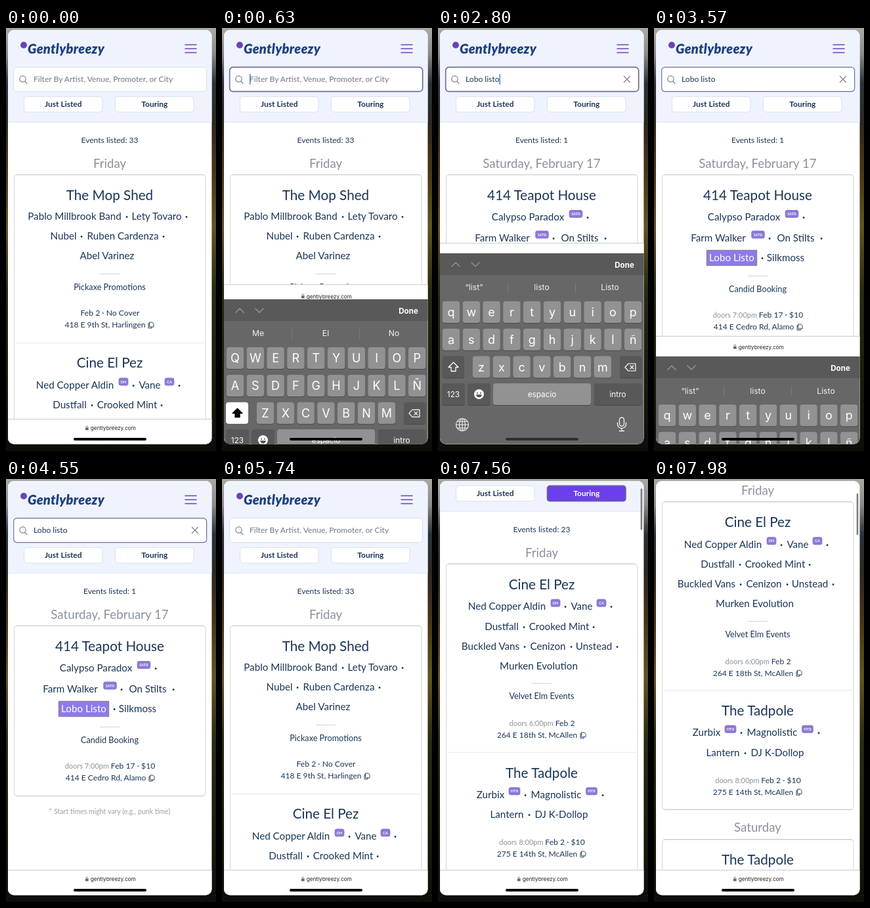
Animation, 320 px wide and 644 px high, one loop 8000 ms. Source, as an HTML page:

```html
<!DOCTYPE html>
<html lang="en">
<head>
<meta charset="utf-8">
<title>Event search</title>
<style>
html, body { margin: 0; height: 100%; overflow: hidden; background: #11150c; }
svg { display: block; width: 100vw; height: 100vh; font-family: Lato, sans-serif; }
.ui { font-family: Inter, Roboto, sans-serif; }
</style>
</head>
<body>
<svg id="stage" viewBox="0 0 320 644">
  <defs>
    <linearGradient id="photo" x2="0" y2="1">
      <stop offset="0" stop-color="#a9a9a4"/><stop offset=".06" stop-color="#8c8b86"/>
      <stop offset=".13" stop-color="#2b323b"/><stop offset=".22" stop-color="#2c2720"/>
      <stop offset=".34" stop-color="#493616"/><stop offset=".47" stop-color="#5f5420"/>
      <stop offset=".62" stop-color="#2a2a12"/><stop offset="1" stop-color="#0d0e09"/>
    </linearGradient>
    <clipPath id="phone"><rect x="3" y="3" width="310.500" height="630.500" rx="9"/></clipPath>
  </defs>
  <rect width="320" height="644" fill="url(#photo)"/>
  <g id="screen" clip-path="url(#phone)"></g>
</svg>
<script>
const NS = 'http://www.w3.org/2000/svg';
const INK = '#1a3555', GREY = '#8b929c', RULE = '#d4d4d6';
const screen = document.getElementById('screen');

function el(parent, tag, attrs = {}) {
  const node = document.createElementNS(NS, tag);
  set(node, attrs);
  return parent.appendChild(node);
}
function set(node, attrs) {
  for (const k in attrs) node.setAttribute(k, attrs[k]);
}
const group = (parent, attrs) => el(parent, 'g', attrs);
const rect = (g, x, y, width, height, fill, more) =>
  el(g, 'rect', { x, y, width, height, fill, ...more });
const path = (g, d, stroke, width = 1, more) =>
  el(g, 'path', { d, stroke, 'stroke-width': width, fill: 'none',
    'stroke-linecap': 'round', 'stroke-linejoin': 'round', ...more });
// y is the middle of the capitals
function text(g, x, y, str, size, fill = INK, more) {
  const node = el(g, 'text', { x, y: y + size * .36, 'font-size': size, fill, 'text-anchor': 'middle', ...more });
  node.textContent = str;
  return node;
}
const show = (node, on) => set(node, { visibility: on ? 'inherit' : 'hidden' });
const clamp = v => Math.max(0, Math.min(1, v));
const easeOut = p => 1 - (1 - clamp(p)) ** 3;
const mix = (a, b, p) => a + (b - a) * p;

// ---- page header ----
rect(screen, 0, 0, 320, 644, '#fff');
const page = group(screen);
rect(page, 0, -40, 320, 183, '#eef3fd');
rect(page, 0, 143, 320, 1, '#dfe7f4');
el(page, 'circle', { cx: 27, cy: 26, r: 5, fill: '#6a45b8' });
text(page, 33, 32, 'Gentlybreezy', 20, '#1d3f80',
  { 'text-anchor': 'start', 'font-weight': 900, 'font-style': 'italic', 'letter-spacing': .3 });
path(page, 'M273 25.500h17M273 31.500h17M273 37.500h17', '#6d3fb4', 1.5);

const box = rect(page, 11.7, 59.700, 294, 37, '#fff', { rx: 5 });
path(page, 'M29 81.500l3 3M30.200 77.500a4.700 4.700 0 1 1-9.400 0a4.700 4.700 0 1 1 9.400 0', '#7c8490', 1.2);
const left = { 'text-anchor': 'start' };
const hint = text(page, 42, 78, 'Filter By Artist, Venue, Promoter, or City', 12.1, '#6f7884', left);
const query = text(page, 42, 78, '', 12.1, INK, left);
const caret = rect(page, 42, 70, 1.5, 16, '#3f86d6');
const clear = path(page, 'M283.500 73.500l9 9M292.500 73.500l-9 9', '#747b88', 1.2);

function button(x, label) {
  return {
    back: rect(page, x, 104.500, 119.500, 23.500, '#fff', { rx: 4, stroke: '#dbe1ec' }),
    label: text(page, x + 59.8, 116, label, 12, INK, { 'font-weight': 700 })
  };
}
button(27.500, 'Just Listed');
const touring = button(166.500, 'Touring');
const count = text(page, 158, 171, '', 12.1);

// ---- event lists ----
const title = (g, y, str) => text(g, 158, y, str, 20.7);
const day = (g, y, str) => text(g, 158, y, str, 18.7, GREY);
const rule = (g, y) => rect(g, 143, y, 30, 1, '#cfd1d4');
const split = (g, y) => rect(g, 15, y, 287, 1, '#e6e7e9');
const promoter = (g, y, str) => text(g, 158, y, str, 12.7);

function card(g, top, bottom) {
  rect(g, 12.5, top + .5, 291.500, bottom - top, 'none', { rx: 4, stroke: RULE });
  rect(g, 16, top, 285, 1, '#c4c5c8');
  rect(g, 16, bottom, 285, 1.3, '#cbccd0');
}
// cells: centre x, text; "#" marks a state badge
function row(g, y, ...cells) {
  for (let i = 0; i < cells.length; i += 2) {
    const x = cells[i], s = cells[i + 1];
    if (s[0] === '#') {
      const w = 9 + 2.9 * (s.length - 1);
      rect(g, x - w / 2, y - 11, w, 12, '#8d78d6', { rx: 3.5 });
      text(g, x, y - 5, s.slice(1), 5.6, '#fff', { 'font-weight': 700 });
    } else {
      text(g, x, y, s, 15.2, INK, s === '·' ? { 'font-weight': 700 } : {});
    }
  }
}
function details(g, y, doors, date, address, iconX) {
  const line = text(g, 158.500, y, '', 12.2);
  if (doors) {
    const t = el(line, 'tspan', { 'font-size': 11, fill: GREY });
    t.textContent = 'doors ' + doors + ' ';
  }
  line.append(date);
  text(g, iconX - 70, y + 18, address, 12.1);
  path(g, `M${iconX - 2} ${y + 14}h4l2 2v5h-6zM${iconX - 2} ${y + 16}h-2v7h5v-2`, INK, .9);
}
function cine(g) {
  title(g, 254.500, 'Cine El Pez');
  row(g, 288, 105, 'Ned Copper Aldin', 179, '#OH', 194, '·', 219, 'Vane', 249, '#CA', 264, '·');
  row(g, 318.500, 97, 'Dustfall', 131, '·', 184.500, 'Crooked Mint', 237, '·');
  row(g, 348.500, 80, 'Buckled Vans', 132, '·', 167.500, 'Cenizon', 203, '·', 237.500, 'Unstead', 273, '·');
  row(g, 378.500, 153.500, 'Murken Evolution');
  rule(g, 405);
  promoter(g, 425, 'Velvet Elm Events');
  details(g, 466, '6:00pm', 'Feb 2', '264 E 18th St, McAllen', 221);
}

const all = group(page);
day(all, 206, 'Friday');
card(all, 223, 900);
title(all, 254.500, 'The Mop Shed');
row(all, 287, 104.500, 'Pablo Millbrook Band', 184, '·', 229.500, 'Lety Tovaro', 275, '·');
row(all, 317, 87.500, 'Nubel', 115, '·', 178, 'Ruben Cardenza', 240, '·');
row(all, 347, 154, 'Abel Varinez');
rule(all, 374);
promoter(all, 394, 'Pickaxe Promotions');
details(all, 434, '', 'Feb 2 · No Cover', '418 E 9th St, Harlingen', 221);
split(all, 479);
cine(group(all, { transform: 'translate(0 255.500)' }));

const found = group(page);
day(found, 206, 'Saturday, February 17');
card(found, 223, 482);
title(found, 254.500, '414 Teapot House');
row(found, 288, 137, 'Calypso Paradox', 210, '#SATX', 228, '·');
row(found, 319.500, 98, 'Farm Walker', 158.500, '#SATX', 176, '·', 216, 'On Stilts', 255, '·');
rect(found, 80.500, 338.500, 76, 23, '#9079ea', { stroke: '#8a80a0', 'stroke-width': 1.4 });
text(found, 118.500, 350, 'Lobo Listo', 15.2, '#fff');
row(found, 350, 165, '·', 200.500, 'Silkmoss');
rule(found, 377);
promoter(found, 397, 'Candid Booking');
details(found, 437, '7:00pm', 'Feb 17 · $10', '414 E Cedro Rd, Alamo', 222);
text(found, 158, 506, '* Start times might vary (e.g., punk time)', 10.6, '#9a9fa7');

const tours = group(page);
day(tours, 206, 'Friday');
card(tours, 223, 691.500);
cine(tours);
split(tours, 510);
title(tours, 541.500, 'The Tadpole');
row(tours, 574.500, 80, 'Zurbix', 116.500, '#HTX', 133, '·', 180, 'Magnolistic', 234, '#HTX', 251, '·');
row(tours, 605, 105, 'Lantern', 139, '·', 188, 'DJ K-Dollop');
details(tours, 647, '8:00pm', 'Feb 2 · $10', '275 E 14th St, McAllen', 221);
day(tours, 719, 'Saturday');
card(tours, 737, 1000);
title(tours, 768, 'The Tadpole');

const thumb = rect(screen, 308.700, 7, 2.600, 63, '#7d7d80', { rx: 1.300 });

// ---- browser bar ----
const bar = group(screen);
rect(bar, 0, 0, 320, 400, '#fff');
rect(bar, 0, 0, 320, 1, '#c9cacc');
const address = group(bar, { class: 'ui' });
text(address, 163.300, 14.500, 'gentlybreezy.com', 8.2, '#222');
rect(address, 121, 13.500, 4.600, 3.800, '#666', { rx: .8 });
path(address, 'M122 13.500v-1.300a1.300 1.300 0 0 1 2.600 0v1.300', '#666', .8);

// ---- keyboard ----
const board = group(screen, { class: 'ui' });
rect(board, 0, 343, 320, 400, '#676767');
rect(board, 0, 343, 320, 33, '#595959');
path(board, 'M21 363l6-6l6 6M51 357l6 6l6-6', '#8e8e8e', 1.5);
text(board, 284, 360.500, 'Done', 11.6, '#fff', { 'font-weight': 700 });
const picked = rect(board, 106, 380, 104, 30, '#717171', { rx: 4 });
const seams = path(board, 'M106.500 388v15M209.500 388v15', '#7b7b7b', 1);
const words = [55, 158, 262].map(x => text(board, x, 395, '', 12.2, '#f2f2f2'));

function key(x, y, w, fill) {
  rect(board, x, y + 1, w, 33, '#4a4a4a', { rx: 4 });
  return rect(board, x, y, w, 33, fill, { rx: 4 });
}
const letters = [];
[['qwertyuiop', 20], ['asdfghjklñ', 20], ['zxcvbnm', 66]].forEach(([chars, x0], r) => {
  [...chars].forEach((c, i) => {
    const x = x0 + i * 30.800, y = 416 + r * 41.800;
    key(x - 13.200, y, 26.400, '#929292');
    letters.push([c, text(board, x, y + 16.500, c, 18, '#fff')]);
  });
});
const DARK = '#585858';
const shiftKey = key(6, 499.600, 34, DARK);
const shift = path(board, 'M23.500 509l-7.500 7.500h4v6h7v-6h4z', '#fff', 1.3);
key(277, 499.600, 33.500, DARK);
path(board, 'M285 516.500l5-5.500h11v11h-11zM293 514l5 5M298 514l-5 5', '#fff', 1.2);
key(6, 541, 35, DARK);
text(board, 23.500, 557.500, '123', 11.8, '#fff');
key(45.500, 541, 34.500, DARK);
el(board, 'circle', { cx: 62.500, cy: 557.500, r: 7.500, fill: '#fff' });
path(board, 'M60 555.500v.5M65 555.500v.5', '#555', 1.8);
path(board, 'M58.500 559a4.200 4.200 0 0 0 8 0z', '#555', 1, { fill: '#555' });
key(84, 541, 149, '#929292');
text(board, 158.500, 557.500, 'espacio', 11.8, '#fff');
key(238, 541, 72.500, DARK);
text(board, 274, 557.500, 'intro', 11.8, '#fff');
path(board, 'M46.500 604a9.500 9.500 0 1 1-19 0a9.500 9.500 0 1 1 19 0zM41.500 604a4.500 9.500 0 1 1-9 0a4.500 9.500 0 1 1 9 0zM37 594.500v19M27.500 604h19M29.500 599h15M29.500 609h15', '#f4f4f4', 1.1);
rect(board, 276.500, 593, 7, 13, 'none', { rx: 3.500, stroke: '#f4f4f4', 'stroke-width': 1.3 });
path(board, 'M273.500 601v2a6.500 6.500 0 0 0 13 0v-2M280 609.500v4M276.500 613.500h7', '#f4f4f4', 1.3);

const home = rect(screen, 103, 624, 111, 4, '#000', { rx: 2 });

// ---- timeline (ms) ----
const LOOP = 8000, FOCUS = 440, BLUR = 3460, CLEAR = 5530, TOUR = 6400, SCROLL = 7300;
const FOUND = 2000, RESTORED = 5650, TOURED = 6520; // lists answer a moment after the input
const PHRASE = 'Lobo listo';
const STROKES = [1190, 1350, 1500, 1650, 2130, 2260, 2390, 2510, 2630, 2760];
const HINTS = [[0, 'Me', 'El', 'No'], [1260, '“L”', 'Y', 'Los'], [2690, '“list”', 'listo', 'Listo']];

function draw(t) {
  const focused = t >= FOCUS && t < BLUR;
  const typed = STROKES.filter(s => s <= t);
  const filled = t < CLEAR ? typed.length : 0;
  const up = easeOut((t - FOCUS) / 500) - easeOut((t - BLUR) / 500);

  query.textContent = PHRASE.slice(0, filled);
  show(hint, !filled);
  show(clear, filled);
  show(caret, focused && (t - Math.max(FOCUS, ...typed)) % 1000 < 600);
  set(caret, { x: 42 + (filled ? query.getComputedTextLength() : 0) });
  const lit = t >= FOCUS && t < CLEAR;
  set(box, { stroke: lit ? '#746d94' : '#d6dce6', 'stroke-width': focused ? 1.7 : lit ? 1.2 : 1 });

  const filtered = t >= FOUND && t < RESTORED, toured = t >= TOURED;
  show(all, !filtered && !toured);
  show(found, filtered);
  show(tours, toured);
  count.textContent = 'Events listed: ' + (toured ? 23 : filtered ? 1 : 33);
  const on = t >= TOUR;
  set(touring.back, { fill: on ? '#6b3fec' : '#fff', stroke: on ? '#6a6585' : '#dbe1ec', 'stroke-width': on ? 1.6 : 1 });
  set(touring.label, { fill: on ? '#fff' : INK });

  const p = clamp((t - SCROLL) / 690);
  const moved = 190 * p * (1.5 - .5 * p);
  set(page, { transform: `translate(0 ${-moved})` });
  set(thumb, { y: 7 + moved * .08, opacity: clamp((t - SCROLL) / 120) });

  set(bar, { transform: `translate(0 ${mix(595, 327, up)})` });
  set(address, { transform: `translate(0 ${5 * up})`, opacity: clamp((1 - up) * 6) });
  set(board, { transform: `translate(0 ${mix(297, 0, up)})` });
  show(board, up > 0);
  set(home, { opacity: 1 - .45 * clamp(up * 4 - 3) });

  const caps = !typed.length;
  letters.forEach(([c, node]) => { node.textContent = caps ? c.toUpperCase() : c; });
  set(shiftKey, { fill: caps ? '#fff' : DARK });
  set(shift, { stroke: caps ? '#000' : '#fff', fill: caps ? '#000' : 'none' });
  const hints = HINTS.filter(h => h[0] <= t).pop();
  words.forEach((w, i) => { w.textContent = hints[i + 1]; });
  const middle = hints === HINTS[1];
  show(picked, middle);
  show(seams, !middle);
}
function tick() {
  draw(performance.now() % LOOP);
  requestAnimationFrame(tick);
}
tick();
</script>
</body>
</html>
```
